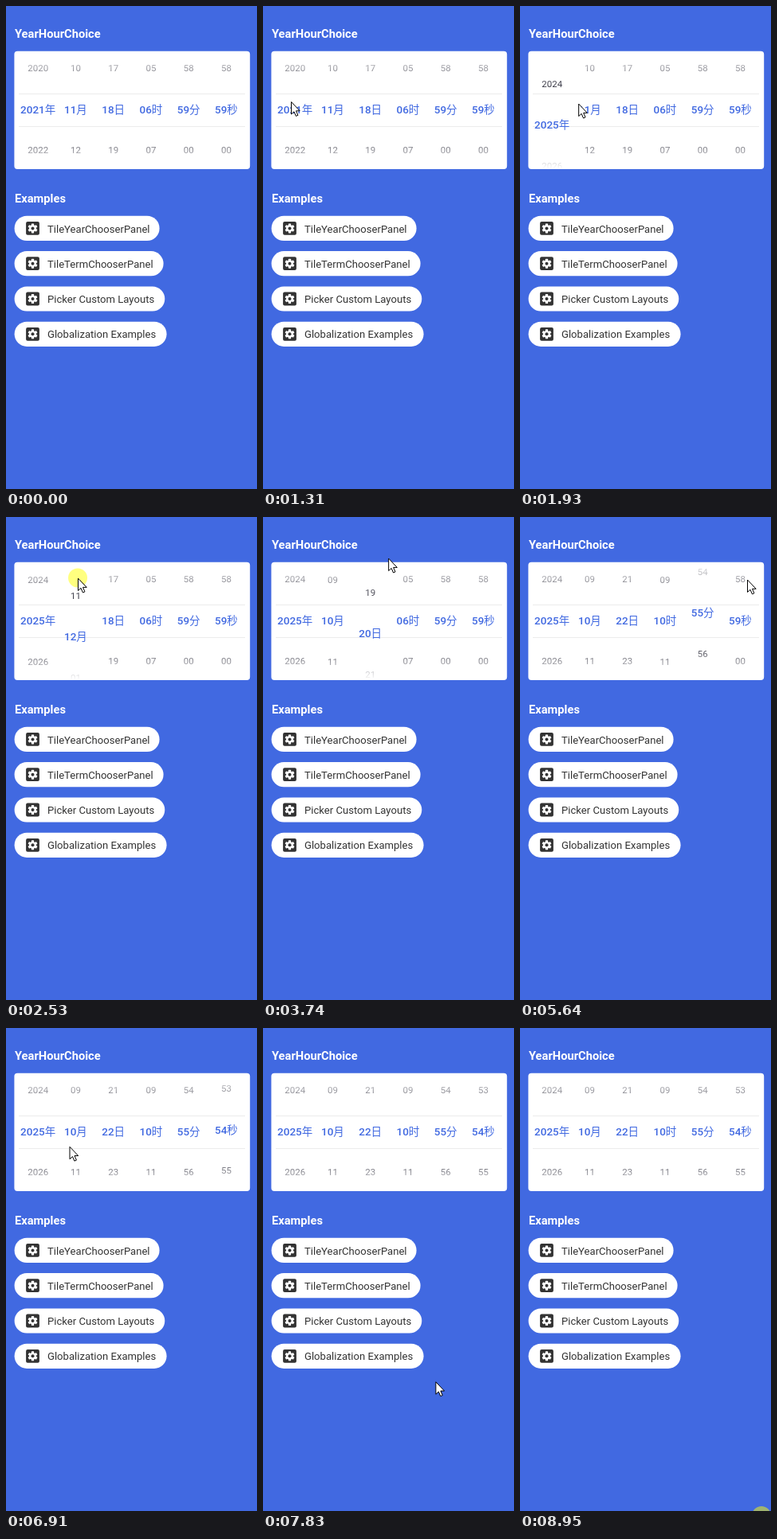
Write an HTML page that moves like this. It is 315x607 px and loops after 9.05 s.

```html
<!DOCTYPE html>
<html lang="zh-CN">
<head>
<meta charset="utf-8">
<title>Wheel demo</title>
<style>
  html, body { margin: 0; height: 100%; overflow: hidden; background: #4169e1; }
  svg { display: block; font-family: Roboto, "Noto Sans CJK SC", "Noto Sans CJK", sans-serif; }
  .head { font-size: 14.7px; font-weight: 700; fill: #fff; }
  .label { font-size: 13.1px; fill: #333; }
  .item { font-size: 11.5px; fill: #333340; text-anchor: middle; }
  .item.on { font-size: 13.5px; font-weight: 500; fill: #4169e1; }
</style>
</head>
<body>
<svg width="315" height="607" viewBox="0 0 315 607">
  <defs>
    <linearGradient id="fade" x2="0" y2="1">
      <stop stop-color="#fff"/>
      <stop offset="1" stop-color="#fff" stop-opacity="0"/>
    </linearGradient>
    <g id="gear">
      <rect x="-8.4" y="-8.4" width="16.8" height="16.8" rx="2" fill="#333"/>
      <g fill="#fff">
        <circle r="4.4"/>
        <rect id="tooth" x="-1.6" y="-6" width="3.2" height="12" rx=".6"/>
        <use href="#tooth" transform="rotate(60)"/>
        <use href="#tooth" transform="rotate(120)"/>
      </g>
      <circle r="2" fill="#333"/>
    </g>
  </defs>
  <text class="head" x="11" y="40">YearHourChoice</text>
  <text class="head" x="11" y="246.6">Examples</text>
  <rect x="10.4" y="56.7" width="295.8" height="148.3" rx="4" fill="#fff"/>
  <path d="M16 110.5H300M16 151.5H300" stroke="#ececec"/>
  <svg id="wheels" y="57" width="315" height="148" viewBox="0 57 315 148"></svg>
  <rect x="15" y="57" width="286" height="44" fill="url(#fade)"/>
  <rect x="15" y="-205" width="286" height="44" fill="url(#fade)" transform="scale(1 -1)"/>
  <g id="pills"></g>
  <g id="pointer">
    <circle id="press" r="12" fill="#ff0" fill-opacity=".5"/>
    <path d="M.5 .5V16L4 12.8 6.4 18.4 8.9 17.3 6.5 11.8H11.2Z" fill="#fff" stroke="#000"/>
  </g>
</svg>
<script>
const LOOP = 9050, ROW = 51.5, MID = 129.8;
const DECAY = 180;               // fling time constant, ms
const REACH = 105;               // length of a drag, px
const LEAD = 120, FOLLOW = 80;   // finger down before and after the spin starts, ms
const $ = id => document.getElementById(id);

function add(parent, tag, attrs, text = '') {
  const el = document.createElementNS('http://www.w3.org/2000/svg', tag);
  for (const k in attrs) el.setAttribute(k, attrs[k]);
  el.textContent = text;
  return parent.appendChild(el);
}

[['TileYearChooserPanel', 182], ['TileTermChooserPanel', 187],
 ['Picker Custom Layouts', 188.7], ['Globalization Examples', 191]].forEach(([text, width], i) => {
  const g = add($('pills'), 'g', { transform: `translate(0 ${279.4 + i * 44.3})` });
  add(g, 'rect', { x: 10.6, y: -15.6, width, height: 31.2, rx: 15.6, fill: '#fff' });
  add(g, 'use', { href: '#gear', x: 33.5 });
  add(g, 'text', { class: 'label', x: 52, y: 5.1 }, text);
});

const cycle = (first, size) => n =>
  String(((n - first) % size + size) % size + first).padStart(2, '0');

// spin: when the wheel starts turning; y, dx: where the drag starts and how far it drifts
const wheels = [
  { unit: '年', from: 2021, steps: 4, label: String, spin: 1510, y: 120, dx: -5 },
  { unit: '月', from: 11, steps: 11, label: cycle(1, 12), spin: 2521, y: 152, dx: 7 },
  { unit: '日', from: 18, steps: 4, label: cycle(1, 31), spin: 3643, y: 156, dx: 22 },
  { unit: '时', from: 6, steps: 4, label: cycle(0, 24), spin: 4550, y: 167, dx: 5 },
  { unit: '分', from: 59, steps: -4, label: cycle(0, 60), spin: 5091, y: 110, dx: 20 },
  { unit: '秒', from: 59, steps: -5, label: cycle(0, 60), spin: 6041, y: 78.5, dx: 3 }
];

// Pointer keys: time, x, y
const keys = [[60, 303, 613], [440, 222, 427], [700, 222, 427]];
const presses = [[8940, LOOP]];

wheels.forEach((w, i) => {
  const x = 40.2 + i * 47.25, handX = 35 + i * 50;
  w.items = [-2, -1, 0, 1, 2].map(() => add($('wheels'), 'text', { x }));

  const down = w.spin - LEAD, up = w.spin + FOLLOW, left = keys.at(-1)[0];
  keys.push([left + .6 * (down - left), handX, w.y], [down, handX, w.y],
    [up, handX + w.dx, w.y - REACH * Math.sign(w.steps)]);
  presses.push([down, up]);
});
keys.push([7100, 57, 145], [8070, 245, 498], [8560, 303, 613], [LOOP, 303, 613]);

function turn({ unit, from, steps, label, spin, items }, t) {
  const pos = from + steps * (1 - Math.exp(-Math.max(0, t - spin) / DECAY));
  const near = Math.round(pos);
  items.forEach((el, i) => {
    const n = near + i - 2, on = n === near;
    el.setAttribute('class', on ? 'item on' : 'item');
    el.setAttribute('y', MID + (n - pos) * ROW + (on ? 4.8 : 4.1));
    el.textContent = label(n) + (on ? unit : '');
  });
}

function pointerAt(t) {
  const i = Math.max(1, keys.findIndex(k => k[0] > t));
  const [t0, x0, y0] = keys[i - 1], [t1, x1, y1] = keys[i];
  const u = Math.max(0, (t - t0) / (t1 - t0)), s = u * u * (3 - 2 * u);
  return [x0 + (x1 - x0) * s, y0 + (y1 - y0) * s];
}

function draw(now) {
  const t = now % LOOP;
  wheels.forEach(w => turn(w, t));
  $('pointer').setAttribute('transform', `translate(${pointerAt(t)})`);
  $('press').style.display = presses.some(([a, b]) => t >= a && t < b) ? '' : 'none';
  requestAnimationFrame(draw);
}
draw(0);
</script>
</body>
</html>
```
